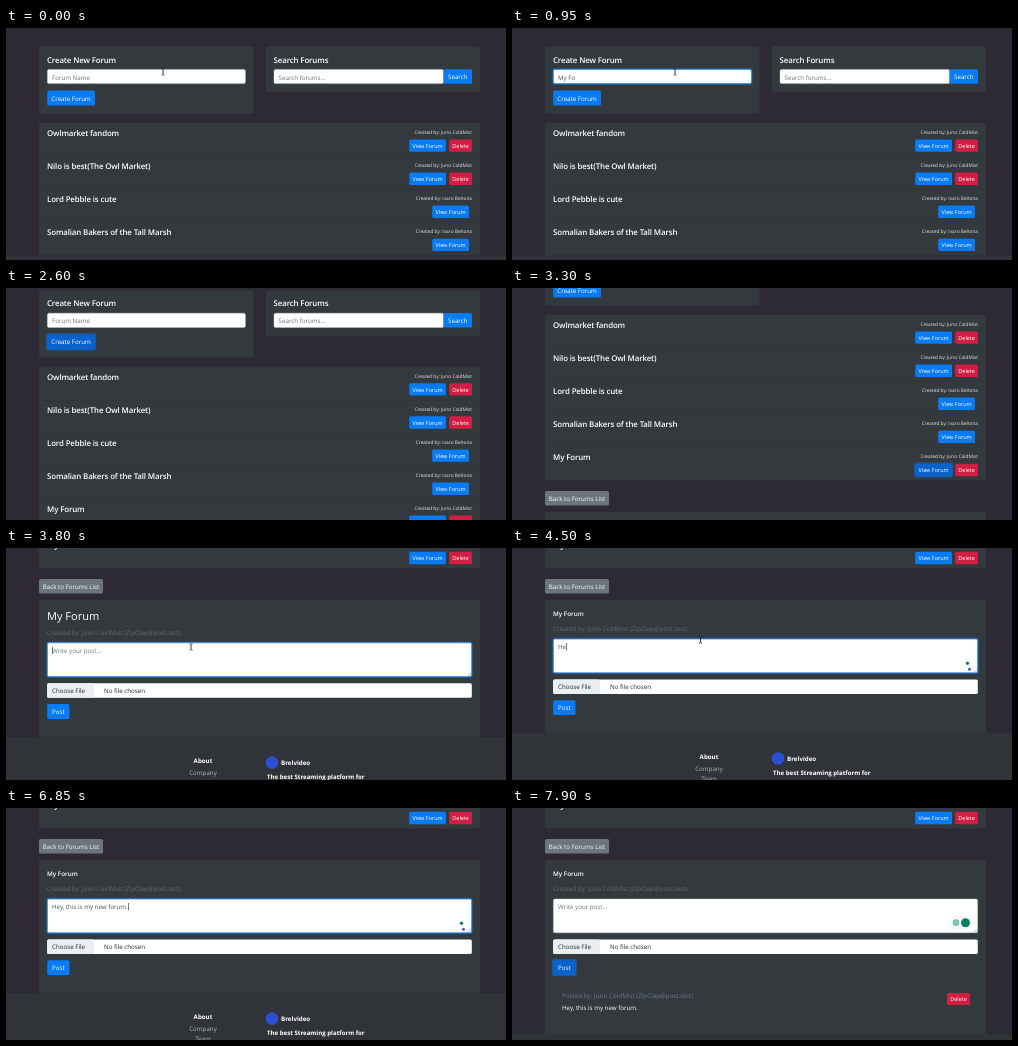
Write an HTML page that moves like this. It is 500x232 px and loops after 8000 ms.

```html
<!DOCTYPE html>
<html lang="en">
<head>
<meta charset="utf-8">
<title>Forums</title>
<style>
  html, body { margin: 0; width: 100%; height: 100%; overflow: hidden; background: #2d2a36; }
  svg { display: block; width: 500px; height: 232px; }
  text {
    font-family: "Open Sans", "Noto Sans", sans-serif; font-size: 6.2px;
    white-space: pre; text-rendering: geometricPrecision;
  }
</style>
</head>
<body>
<svg id="stage" viewBox="0 0 500 232"></svg>
<script>
const LOOP = 8000, PITCH = 33.1, LIST_TOP = 95, FORUM_TOP = 292;
const BLUE = '#087bf5', BLUE_DARK = '#0a62cc', RED = '#d01f43', GREY = '#6c757d', CARD = '#33393d', INK = '#495057';
const USER = 'Juno ColdMist', OTHER = 'Ivaro Beltona', MAIL = 'ZipClap@post.test';
const NAME = 'My Forum', POST = 'Hey, this is my new forum.';
const stage = document.getElementById('stage');

function el(tag, attrs, parent) {
  const node = document.createElementNS('http://www.w3.org/2000/svg', tag);
  set(node, attrs);
  parent.appendChild(node);
  return node;
}
function set(node, attrs) {
  for (const k in attrs) node.setAttribute(k, attrs[k]);
}
const group = (parent, y = 0) => el('g', { transform: `translate(0 ${y})` }, parent);
const rect = (parent, x, y, width, height, fill, rx = 0) => el('rect', { x, y, width, height, fill, rx }, parent);
const show = (node, on) => set(node, { display: on ? 'inline' : 'none' });
const moveY = (node, y) => set(node, { transform: `translate(0 ${y})` });

function label(parent, x, y, str, fill = '#fff', size = 6.2, weight = 400, anchor = 'start') {
  const node = el('text', { x, y, fill, 'font-weight': weight, 'text-anchor': anchor }, parent);
  node.style.fontSize = size + 'px';
  node.textContent = str;
  return node;
}
function heading(parent, y, str, x = 41) {
  label(parent, x, y, str, '#fff', 7.9, 600).style.letterSpacing = '-.017em';
}
function button(parent, x, y, w, h, str, fill = BLUE, size = 6.2) {
  const ring = rect(parent, x - 1.2, y - 1.2, w + 2.4, h + 2.4, 'rgba(0,123,255,.5)', 2.4);
  const face = rect(parent, x, y, w, h, fill, 1.5);
  label(parent, x + w / 2, y + h / 2 + size * 0.43, str, '#fff', size, 400, 'middle');
  show(ring, false);
  return (hover, focus) => {
    set(face, { fill: hover ? BLUE_DARK : fill });
    show(ring, focus);
  };
}
function field(parent, x, y, w, h) {
  const ring = rect(parent, x - 1.2, y - 1.2, w + 2.4, h + 2.4, 'rgba(0,123,255,.35)', 2.4);
  const box = rect(parent, x + 0.2, y + 0.2, w - 0.4, h - 0.4, '#fff', 1.5);
  show(ring, false);
  return on => {
    show(ring, on);
    set(box, { stroke: on ? '#3d8fe6' : '#ced4da', 'stroke-width': on ? 0.8 : 0.4 });
  };
}

// Page
rect(stage, 0, 0, 500, 232, '#2d2a36');
const page = group(stage);

rect(page, 33, 18.5, 214.5, 67, CARD, 1.5);
heading(page, 34.7, 'Create New Forum');
const nameFocus = field(page, 41.2, 41.2, 198.4, 14.6);
const nameText = label(page, 46, 51.7, '');
const createState = button(page, 41.2, 62.6, 47.8, 14.8, 'Create Forum');

rect(page, 260, 18.5, 214, 45.5, CARD, 1.5);
heading(page, 34.7, 'Search Forums', 267.6);
field(page, 267.8, 41.2, 170, 14.6)(false);
label(page, 272.6, 51.7, 'Search forums...', GREY);
button(page, 437.5, 41.2, 28.5, 14.6, 'Search');

// Forum list
const listCard = rect(page, 33, LIST_TOP, 441, 133, CARD, 1.5);
function item(i, title, own) {
  const g = group(page, LIST_TOP + i * PITCH);
  if (i) rect(g, 33, 0, 441, 0.5, 'rgba(0,0,0,.15)');
  heading(g, 12.9, title);
  label(g, 466, 10.9, 'Created by: ' + (own ? USER : OTHER), '#e4e6e8', 4.8, 400, 'end');
  const state = button(g, own ? 403.2 : 426.2, 16.4, 36.8, 12.4, 'View Forum', BLUE, 5.5);
  if (own) button(g, 443.2, 16.4, 22.8, 12.4, 'Delete', RED, 5.5);
  return { g, state };
}
item(0, 'Owlmarket fandom', true);
item(1, 'Nilo is best(The Owl Market)', true);
item(2, 'Lord Pebble is cute', false);
item(3, 'Somalian Bakers of the Tall Marsh', false);
const added = item(4, NAME, true);

// Opened forum
const forum = group(page, FORUM_TOP);
button(forum, 33, -21, 64, 14.6, 'Back to Forums List', GREY);
const forumCard = rect(forum, 33, 0, 441, 137, CARD, 1.5);
const bigTitle = label(forum, 41, 19.8, NAME, '#fff', 11, 500);
const smallTitle = label(forum, 41, 16, NAME, '#fff', 6.3, 600);
const body = group(forum);
label(body, 41, 34.5, `Created by: ${USER} (${MAIL})`, '#646c73', 6.3);
const postFocus = field(body, 41.2, 42.6, 424.6, 34.2);
const postText = label(body, 46, 52.9, '');
const caret = rect(body, 46, 46.8, 0.6, 7.4, '#222');
el('path', { d: 'M462 76l3-3M464 76l1-1', stroke: '#777', 'stroke-width': 0.5 }, body);
const dots = group(body);
el('circle', { cx: 455.5, cy: 67, r: 1.7, fill: '#12806a' }, dots);
el('circle', { cx: 457.5, cy: 73, r: 1.5, fill: '#2f62d9' }, dots);
const badges = group(body);
set(rect(badges, 438, 61, 21, 11, '#fff', 5.5), { stroke: '#d5dade', 'stroke-width': 0.5 });
el('circle', { cx: 444, cy: 66.5, r: 3.4, fill: '#7cc5b2' }, badges);
el('circle', { cx: 453.5, cy: 66.5, r: 4.5, fill: '#0f8068' }, badges);
rect(body, 41.2, 83.2, 424.6, 14.6, '#fff', 1.5);
rect(body, 41.2, 83.2, 46.8, 14.6, '#eceff1', 1.5);
label(body, 46, 93.2, 'Choose File', '#212529', 6.2, 500);
label(body, 98, 93.2, 'No file chosen', '#212529');
const postState = button(body, 41.2, 104.1, 22.3, 14.8, 'Post');
const reply = group(forum);
label(reply, 50, 137.5, `Posted by: ${USER} (${MAIL})`, '#727a82', 6.3);
label(reply, 50, 149.5, POST);
button(reply, 435, 133, 23, 12, 'Delete', RED, 5.5);

// Footer
const footer = group(page);
rect(footer, 0, 0, 500, 300, '#303438');
label(footer, 197, 25.9, 'About', '#fff', 6.2, 700, 'middle');
label(footer, 197, 37.6, 'Company', '#b3b7bb', 6.2, 400, 'middle');
label(footer, 197, 48, 'Team', '#b3b7bb', 6.2, 400, 'middle');
el('circle', { cx: 266, cy: 25.5, r: 6.3, fill: '#2d4fd8' }, footer);
label(footer, 275, 28.4, 'Brelvideo', '#fff', 6.2, 700);
label(footer, 261, 42.4, 'The best Streaming platform for', '#fff', 6.1, 700);

const beam = el('path', {
  d: 'M-1.5 -3H-.4M.4 -3H1.5M0 -2.7V2.7M-1.5 3H-.4M.4 3H1.5',
  stroke: '#222', 'stroke-width': 0.9, fill: 'none'
}, stage);

// Piecewise interpolation over [time, value] points
function track(points, t, ease = p => p) {
  let [t0, v0] = points[0];
  for (const [t1, v1] of points) {
    if (t < t1) return t <= t0 ? v0 : v0 + (v1 - v0) * ease((t - t0) / (t1 - t0));
    t0 = t1; v0 = v1;
  }
  return v0;
}
const smooth = p => p * p * (3 - 2 * p);
const SCROLL = [[2550, 0], [2600, 16], [2850, 68], [3400, 68], [3460, 82], [3580, 215], [3660, 240]];
const MOUSE_X = [[0, 157], [250, 163], [1400, 163], [1620, 66], [2700, 66], [3050, 421], [3460, 421], [3700, 185],
  [3900, 185], [4100, 188.5], [6700, 188.5], [7000, 52]];
const MOUSE_Y = [[0, 44], [1400, 44], [1620, 70], [2700, 70], [3050, 182], [3460, 182], [3700, 99],
  [3900, 99], [4100, 92], [6700, 92], [7000, 160]];
const NAME_KEYS = [[420, 0], [900, 5], [1250, 8]];
const POST_KEYS = [[4200, 0], [5480, 12], [6400, 26]];

function type(node, str, keys, t, hint, cleared) {
  const n = t < cleared ? Math.floor(track(keys, t) + 1e-6) : 0;
  node.textContent = n ? str.slice(0, n) : hint;
  set(node, { fill: n ? INK : GREY });
  return n;
}

function draw(t) {
  const isAdded = t >= 2200, isOpen = t >= 3250, compact = t >= 3950, posted = t >= 7550;
  moveY(page, -track(SCROLL, t));

  type(nameText, NAME, NAME_KEYS, t, 'Forum Name', 2200);
  nameFocus(t >= 250 && t < 1750);
  createState(t >= 1570 && t < 3100, t >= 1750 && t < 3100);

  const listHeight = PITCH * (isAdded ? 5 : 4);
  set(listCard, { height: listHeight });
  show(added.g, isAdded);
  added.state(t >= 3050 && t < 3700, t >= 3200 && t < 3700);

  show(forum, isOpen);
  show(bigTitle, !compact);
  show(smallTitle, compact);
  moveY(body, compact ? -3.8 : 0);
  const inPost = t >= 3700 && t < 7200;
  postFocus(inPost);
  const n = type(postText, POST, POST_KEYS, t, 'Write your post...', 7550);
  show(caret, inPost && t < 6900);
  set(caret, { x: 46 + (n ? postText.getComputedTextLength() + 0.4 : 0) });
  show(dots, t >= 4250 && t < 7200);
  show(badges, posted);
  postState(t >= 6950, t >= 7200);
  show(reply, posted);
  const height = posted ? 174 : compact ? 133 : 137;
  set(forumCard, { height });
  moveY(footer, isOpen ? FORUM_TOP + height : LIST_TOP + listHeight);

  const x = track(MOUSE_X, t, smooth), y = track(MOUSE_Y, t, smooth);
  set(beam, { transform: `translate(${x} ${y})` });
  show(beam, t < 1750 ? y < 56 : t >= 3660 && y < 125);
}

const start = performance.now();
function tick() {
  draw((performance.now() - start) % LOOP);
  requestAnimationFrame(tick);
}
draw(0);
requestAnimationFrame(tick);
</script>
</body>
</html>
```
